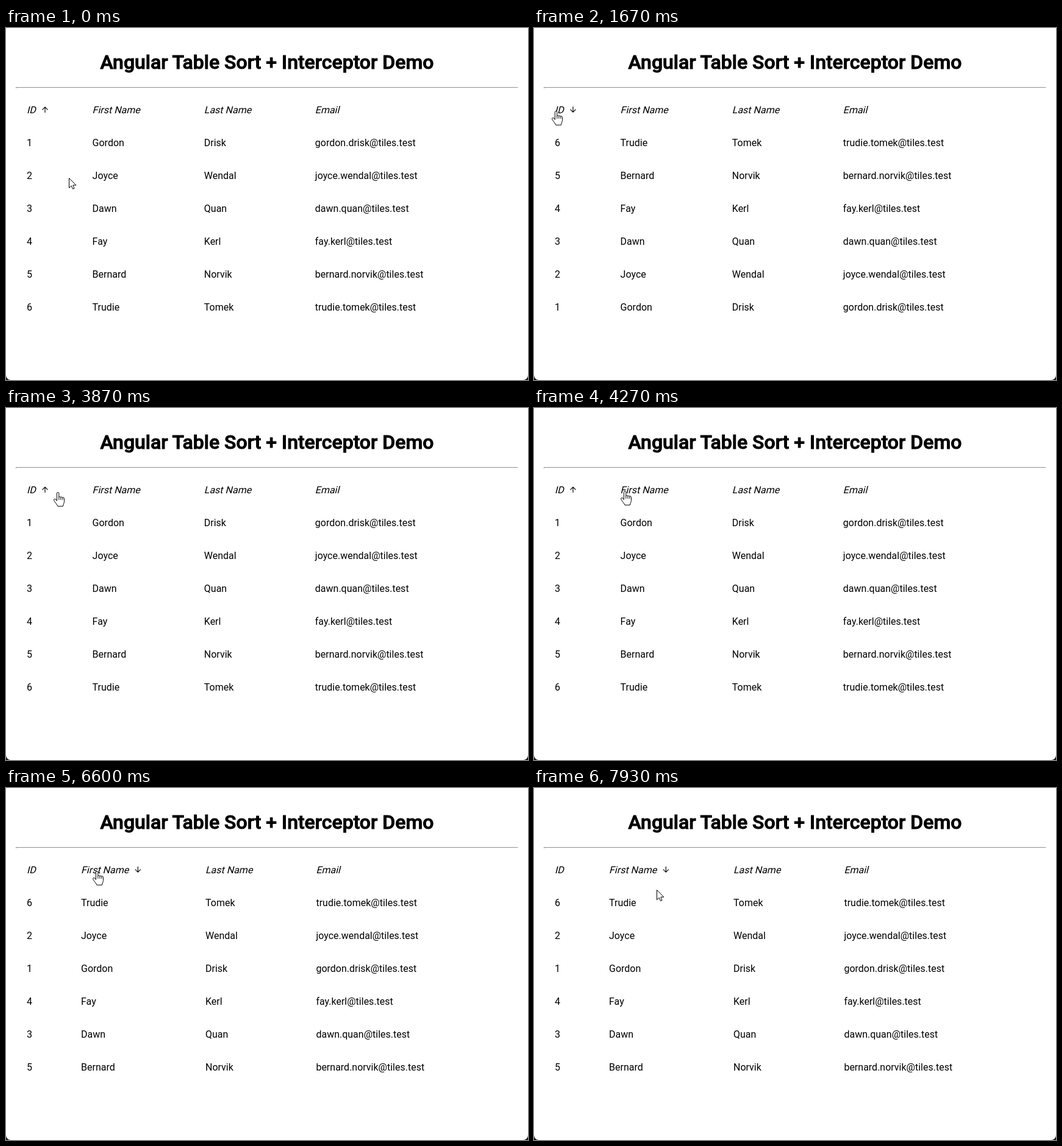
Recreate the animation shown at these times as an HTML page. Size 856 by 578 pixels, loop 8000 ms.

```html
<!DOCTYPE html>
<html lang="en">
<head>
<meta charset="utf-8">
<title>Angular Table Sort + Interceptor Demo</title>
<style>
  html, body { margin: 0; width: 100%; height: 100%; overflow: hidden; background: #1c1c1c; }
  svg { display: block; width: 856px; height: 578px; }
  text { font: 16px Roboto, Arial, sans-serif; fill: #000; white-space: pre; }
  .title { font-size: 32px; font-weight: 500; text-anchor: middle; stroke: #000; stroke-width: 1px; }
  #sort { fill: none; stroke: #000; stroke-width: 1.15; }
  .cursor { fill: #fff; stroke: #000; stroke-linejoin: round; stroke-linecap: round; }
</style>
</head>
<body>
<svg viewBox="0 0 856 578">
  <path d="M0 0H856V570a8 8 0 0 1-8 8H8a8 8 0 0 1-8-8Z" fill="#fff"/>
  <text class="title" x="428" y="67">Angular Table Sort + Interceptor Demo</text>
  <rect x="16" y="97" width="824" height="2" fill="#eee"/>
  <path d="M16 97H839V98H17V99H16Z" fill="#9a9a9a"/>
  <g id="table"></g>
  <path id="sort" d="M0 5V-4M-4.5 .4L0 -4.1L4.5 .4"/>
  <path id="arrow" class="cursor" d="M.5 .9V16.6L4.2 13.1L6.5 18.4L9 17.3L6.8 12.1H11.5Z"/>
  <g id="hand" class="cursor">
    <path d="M-1.6 14V2.2a1.7 1.7 0 0 1 3.4 0V8.6c.3-1.5 2.9-1.4 3.1 .3c.4-1.3 2.8-1.1 3 .6c.5-1.1 2.6-.8 2.6 1V15.6C10.5 18.5 8.8 19.8 8.5 23.3H-.2C-.6 20.6-5.8 16.2-6.4 13.3C-6.6 11.4-4.4 10.7-3.2 12.1Z"/>
    <path d="M1.8 8.6V12.5M4.9 8.9V12.5M7.9 9.5V12.5" fill="none"/>
  </g>
</svg>
<script>
const LOOP = 8000;
const LABELS = ['ID', 'First Name', 'Last Name', 'Email'];
const PEOPLE = [
  ['Gordon', 'Drisk'], ['Joyce', 'Wendal'], ['Dawn', 'Quan'],
  ['Fay', 'Kerl'], ['Bernard', 'Norvik'], ['Trudie', 'Tomek']
].map(([first, last], i) =>
  [String(i + 1), first, last, `${first}.${last}@tiles.test`.toLowerCase()]);

// Column positions and arrow position for each sorted column
const LAYOUTS = [
  { cols: [34, 141.6, 324.8, 506.8], arrow: 64 },
  { cols: [34, 123, 327, 508.4], arrow: 216.3 }
];
const SORTS = [
  { at: 0, col: 0, dir: 1 },
  { at: 1600, col: 0, dir: -1 },
  { at: 3270, col: 0, dir: 1 },
  { at: 4870, col: 1, dir: 1 },
  { at: 6600, col: 1, dir: -1 }
];
const MOVES = [
  { start: 530, end: 1270, steps: 12, from: [103, 246], to: [36, 136], dip: 0 },
  { start: 3600, end: 4270, steps: 11, from: [36, 136], to: [149, 136], dip: 2 },
  { start: 7800, end: 7930, steps: 3, from: [149, 136], to: [201, 167], dip: 0 }
];
const HEAD_BASELINE = 140;
const HEAD_BOTTOM = 161;
const ROW_HEIGHT = 54;
const SLANT = ' skewX(-14)';

const byId = id => document.getElementById(id);

function addText() {
  const el = document.createElementNS('http://www.w3.org/2000/svg', 'text');
  byId('table').append(el);
  return el;
}

const heads = LABELS.map(addText);
const cells = PEOPLE.map(() => LABELS.map(addText));

function place(el, x, y, extra = '') {
  el.setAttribute('transform', `translate(${x} ${y})${extra}`);
}

function fillRow(row, values, cols, y, extra) {
  row.forEach((el, i) => {
    el.textContent = values[i];
    place(el, cols[i], y, extra);
  });
}

let shown = null;
function drawTable(sort) {
  if (sort === shown) return;
  shown = sort;
  const { cols, arrow } = LAYOUTS[sort.col];
  const sorted = [...PEOPLE].sort((a, b) => sort.dir * (a[sort.col] < b[sort.col] ? -1 : 1));
  // Headings are slanted upright letters, which keep the upright widths
  fillRow(heads, LABELS, cols, HEAD_BASELINE, SLANT);
  cells.forEach((row, i) => fillRow(row, sorted[i], cols, HEAD_BASELINE + (i + 1) * ROW_HEIGHT));
  place(byId('sort'), arrow, 134, sort.dir < 0 ? ' rotate(180)' : '');
}

// The pointer is sampled in discrete steps along an eased path
function pointerAt(t) {
  const move = MOVES.findLast(m => t >= m.start);
  if (!move) return MOVES[0].from;
  const { start, end, steps, from, to, dip } = move;
  const step = Math.floor((t - start) * (steps - 1) / (end - start) + 1e-6) + 1;
  const p = Math.min(step / steps, 1);
  const e = p * p * (3 - 2 * p);
  const [x, y] = from.map((v, i) => Math.round(v + (to[i] - v) * e));
  return [x, y + Math.round(dip * Math.sin(Math.PI * p))];
}

function drawPointer(t) {
  const [x, y] = pointerAt(t);
  const [on, off] = y < HEAD_BOTTOM ? ['hand', 'arrow'] : ['arrow', 'hand'];
  byId(on).style.display = '';
  byId(off).style.display = 'none';
  place(byId(on), x, y);
}

function draw(t) {
  drawTable(SORTS.findLast(s => t >= s.at));
  drawPointer(t);
}

function frame() {
  draw(performance.now() % LOOP);
  requestAnimationFrame(frame);
}
draw(0);
requestAnimationFrame(frame);
</script>
</body>
</html>
```
